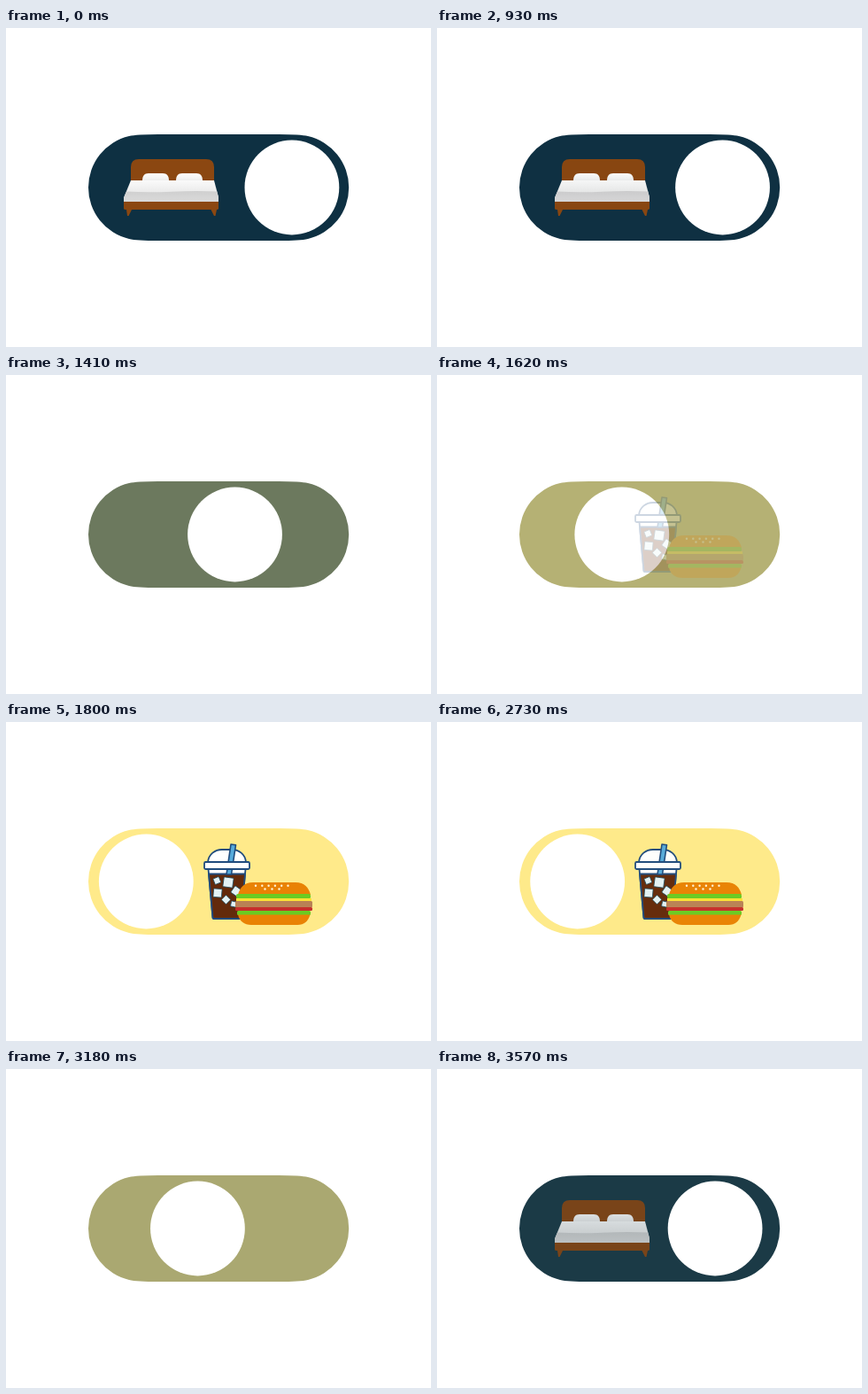
Animation of 480 by 360 pixels, one loop 3.6 s. Source, as an HTML page:

```html
<!DOCTYPE html>
<html lang="en">
<head>
<meta charset="utf-8">
<title>Sleep or snack toggle</title>
<style>
html, body { margin: 0; width: 100%; height: 100%; overflow: hidden; background: #fff; }
svg { display: block; width: 480px; height: 360px; }
</style>
</head>
<body>
<svg viewBox="0 0 480 360">
  <defs>
    <linearGradient id="pillow" x1="0" y1="0" x2="0" y2="1">
      <stop offset="0" stop-color="#fff"/><stop offset="1" stop-color="#ececec"/>
    </linearGradient>
    <linearGradient id="sheet" x1="0" y1="0" x2="0" y2="1">
      <stop offset="0" stop-color="#fafafa"/><stop offset="1" stop-color="#dedede"/>
    </linearGradient>
    <linearGradient id="fold" x1="0" y1="0" x2="0" y2="1">
      <stop offset="0" stop-color="#cfcfcf"/><stop offset="1" stop-color="#dadada"/>
    </linearGradient>
  </defs>

  <path id="pill" d="M93 180A59.5 59.5 0 0 1 139 122Q147.6 120 172 120H308Q332.4 120 341 122A59.5 59.5 0 0 1 341 238Q332.4 240 308 240H172Q147.6 240 139 238A59.5 59.5 0 0 1 93 180Z"/>
  <circle id="knob" cy="180" r="53.4" fill="#fff"/>

  <g id="bed">
    <g fill="#8b4711">
      <path d="M141 173V157Q141 148 150 148H226Q235 148 235 157V173Z"/>
      <path d="M133 195.5H240V203.5Q240 205 238 205H135Q133 205 133 203.5Z"/>
      <path d="M136 205H142L138.5 212H137ZM231.500 205H238L236.500 212H235Z"/>
    </g>
    <g fill="url(#pillow)">
      <path d="M154 172.500C154 167 156 164 161 164H177C182 164 184 167 184 172.500Z"/>
      <path d="M192 172.500C192 167 194 164 199 164H215C220 164 222 167 222 172.500Z"/>
    </g>
    <path d="M141 172H235L240 191V196H133V191.500Z" fill="url(#sheet)"/>
    <path d="M136 184.500Q160 186 187 184.700T238.300 184.500L240 191V196H133V191.500Z" fill="url(#fold)"/>
  </g>

  <g id="food">
    <g stroke="#1f4b7d" stroke-width="1.8" stroke-linejoin="round">
      <path d="M228 158C229 149 236 144 244 144H255C263 144 270 149 271 158Z" fill="#fff"/>
      <path d="M228.500 166L233.500 221Q233.700 222 235 222H264Q265.300 222 265.500 221L270.500 166Z" fill="#fff"/>
      <path d="M229 171.500H270L265.500 221Q265.300 222 264 222H235Q233.700 222 233.500 221Z" fill="#632a0b"/>
      <path d="M254 138L259.500 138.800L254.500 172H249Z" fill="#55aadb" stroke-width="1.600"/>
      <rect x="224" y="158" width="51" height="8" rx="1.500" fill="#fff"/>
    </g>
    <g id="ice" fill="#e3f2f5" stroke="#1f4b5d" stroke-width=".8"></g>
    <path d="M262 195C264 187 269 181 279 181H327C337 181 342 187 344 195Z" fill="#e98204"/>
    <rect x="260" y="194" width="84" height="5.500" rx="2" fill="#6acb22"/>
    <rect x="260" y="199" width="85" height="3.500" fill="#ffe135"/>
    <rect x="259" y="202" width="87" height="7.500" rx="1.500" fill="#b98155"/>
    <rect x="259" y="209" width="87" height="4" rx="1.500" fill="#c62f2b"/>
    <rect x="261" y="213" width="83" height="5" rx="1.500" fill="#6acb22"/>
    <path d="M262 217.500H343.500C341 225 337 229 329 229H277C269 229 264 225 262 217.500Z" fill="#e98204"/>
    <g id="seeds" fill="#fff3d6"></g>
  </g>
</svg>
<script>
const $ = id => document.getElementById(id);
const LOOP = 3600, MOVE = 900;
const NIGHT = [14, 48, 66], DAY = [255, 234, 138];
const LEFT = 158.3, RIGHT = 322.9;

function add(parent, tag, attrs) {
  const el = document.createElementNS("http://www.w3.org/2000/svg", tag);
  for (const k in attrs) el.setAttribute(k, attrs[k]);
  $(parent).appendChild(el);
}

// centre x, centre y, size, tilt
[[238.3, 179, 7, -22], [251, 181, 11, 8], [239, 193, 9.5, 5],
 [260, 191, 9, 35], [248.5, 200.5, 7.5, 45], [257, 205.5, 6, 12]].forEach(([x, y, s, a]) =>
  add("ice", "rect", { x: x - s / 2, y: y - s / 2, width: s, height: s, rx: .8, transform: `rotate(${a} ${x} ${y})` }));

for (let i = 0; i < 6; i++) add("seeds", "circle", { cx: 282 + i * 7.3, cy: 184.8, r: 1.2 });
for (let i = 0; i < 3; i++) add("seeds", "circle", { cx: 292.5 + i * 8, cy: 188.5, r: 1.2 });

// cubic-bezier(.42, 0, 1, 1)
function easeIn(x) {
  if (x <= 0) return 0;
  if (x >= 1) return 1;
  const y = u => u * u * (3 - 2 * u);
  let lo = 0, hi = 1;
  for (let i = 0; i < 24; i++) {
    const u = (lo + hi) / 2;
    if (1.26 * u * (1 - u) ** 2 + y(u) < x) lo = u; else hi = u;
  }
  return y(lo);
}

const mix = (a, b, k) => a + (b - a) * k;

function draw(t) {
  const half = LOOP / 2;
  const back = t >= half;
  const p = Math.max(0, (t % half - MOVE) / MOVE);
  const e = easeIn(p);
  const k = back ? 1 - e : e;
  const out = 1 - easeIn(p * 3);
  const into = easeIn(p * 3 - 2);
  $("pill").setAttribute("fill", `rgb(${NIGHT.map((c, i) => Math.round(mix(c, DAY[i], k)))})`);
  $("knob").setAttribute("cx", mix(RIGHT, LEFT, k));
  $("bed").setAttribute("opacity", back ? into : out);
  $("food").setAttribute("opacity", back ? out : into);
}

const start = performance.now();
function tick() {
  draw((performance.now() - start) % LOOP);
  requestAnimationFrame(tick);
}
draw(0);
requestAnimationFrame(tick);
</script>
</body>
</html>
```
